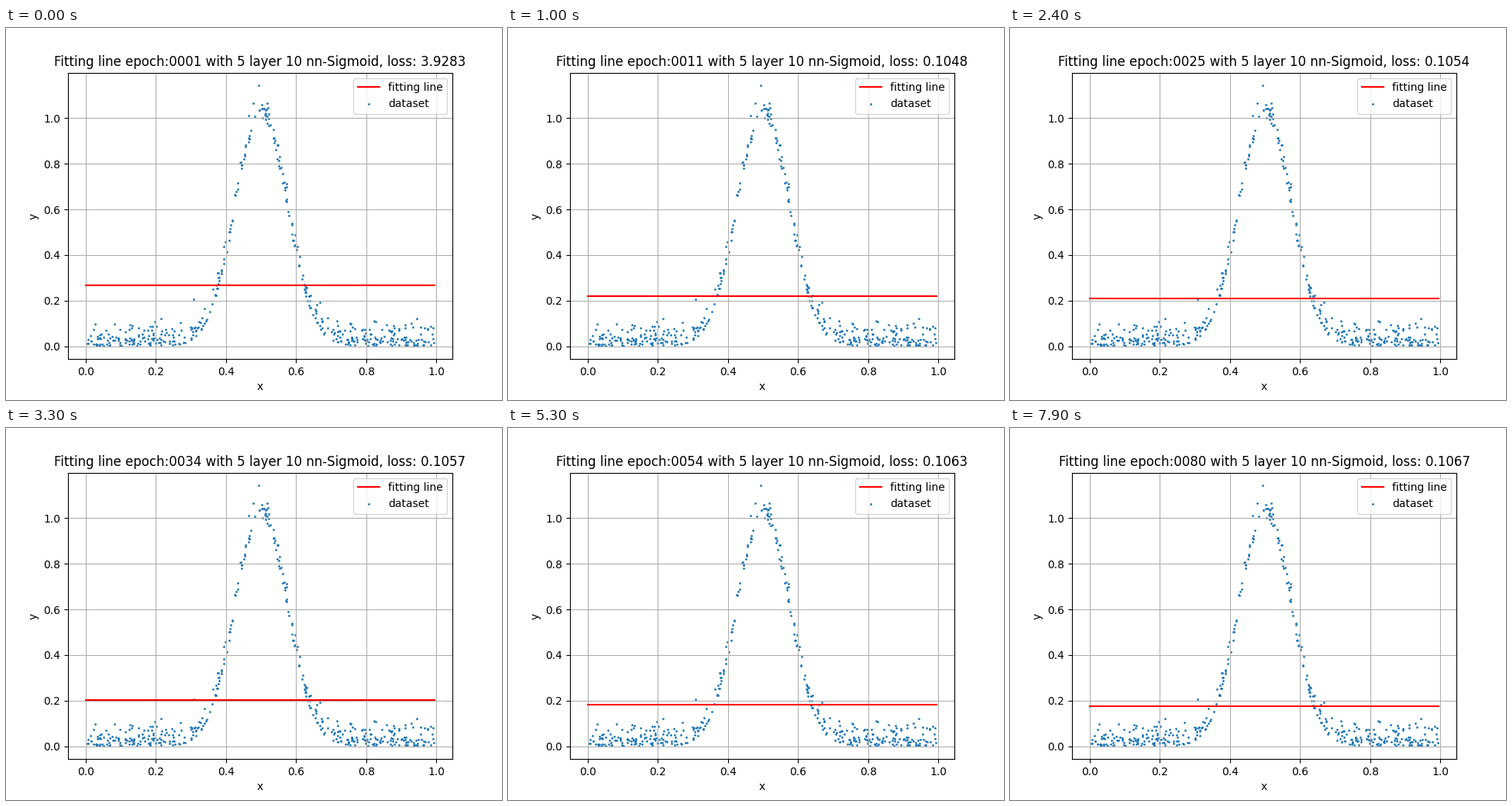
These frames come from a looping animation (640x480 px, 8 s). A matplotlib script:

```python
import numpy as np
import matplotlib.pyplot as plt
from matplotlib.animation import FuncAnimation

FRAMES, STEP_MS = 80, 100
XLIM, YLIM = (-0.0499, 1.0459), (-0.0563, 1.1995)


def level(t):
    """Height of the flat fit: quick overshoot, then a slow sigmoid drift."""
    drift = 0.1725 + 0.054 / (1 + np.exp((t - 35) / 12))
    s = t / 1.2
    return drift + (0.045 - 0.52 * s) * np.exp(-s)


def loss(t):
    """First-step spike, then a slow rise that eases out."""
    return 3.824 * np.exp(-5 * t) + 0.1067 - 0.0019 * ((82 - t) / 72) ** 1.7


def dataset(n=450):
    """Gaussian bell with one-sided noise, plus two clear outliers."""
    rng = np.random.default_rng(7)
    x = rng.uniform(0.002, 0.996, n)
    noise = np.abs(rng.normal(0, 0.047, n)) % 0.125
    y = np.exp(-((x - 0.5) / 0.0735) ** 2 / 2) + noise + 0.001
    return np.append(x, [0.494, 0.308]), np.append(np.minimum(y, 1.09), [1.144, 0.206])


fig, ax = plt.subplots(figsize=(6.4, 4.8), dpi=100)
line, = ax.plot([0, 0.996], [level(0)] * 2, color="red", label="fitting line")
ax.scatter(*dataset(), s=1, label="dataset")
ax.set(xlim=XLIM, ylim=YLIM, xlabel="x", ylabel="y")
ax.grid(True)
ax.legend(loc="upper right")
title = ax.set_title("")


def update(i):
    line.set_ydata([level(i)] * 2)
    title.set_text(f"Fitting line epoch:{i + 1:04d} with 5 layer 10 nn-Sigmoid, "
                   f"loss: {loss(i):.4f}")
    return line, title


anim = FuncAnimation(fig, update, frames=FRAMES, interval=STEP_MS,
                     repeat=True, repeat_delay=0)
plt.show()
```
